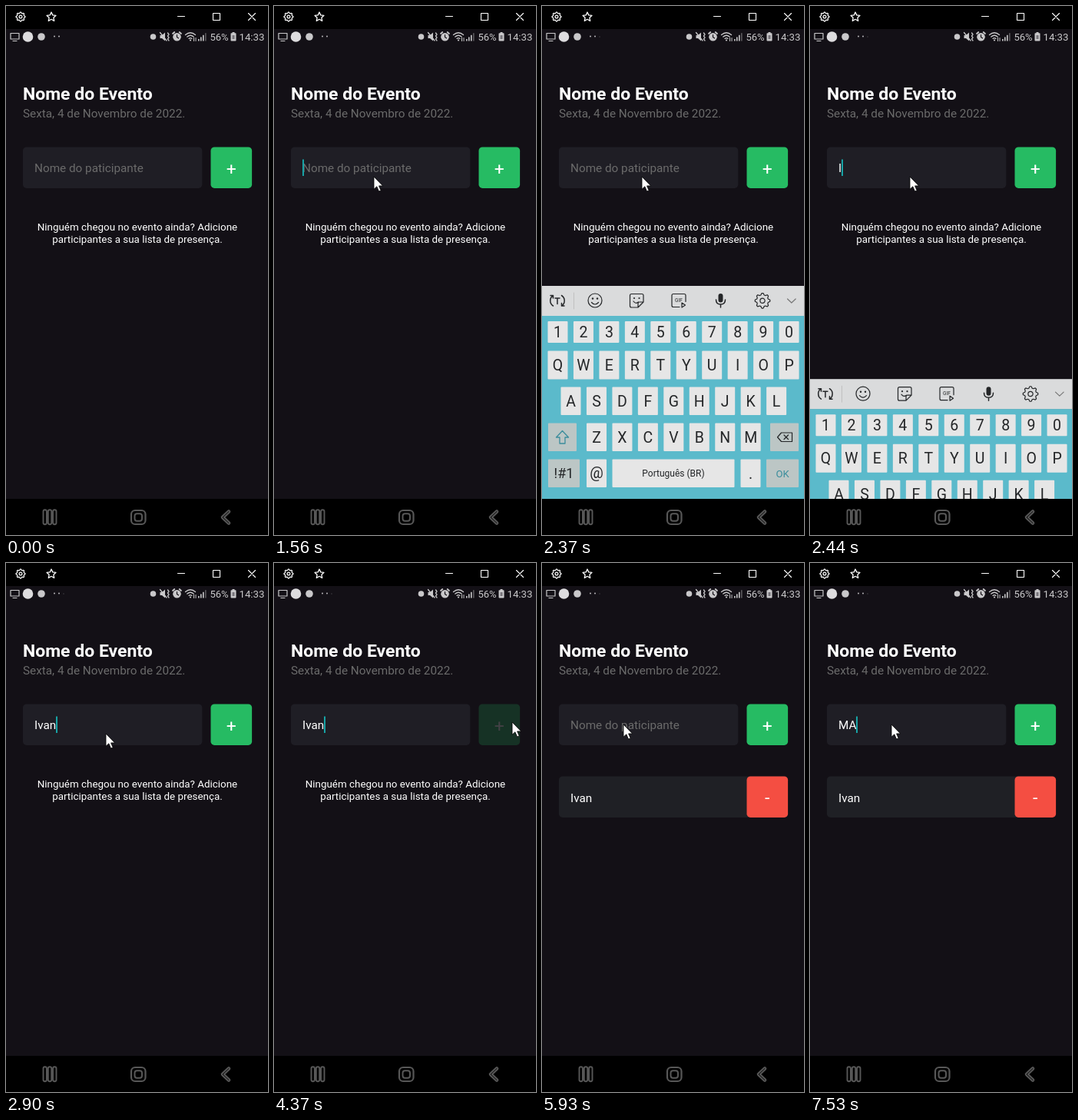
Recreate the animation shown at these times as an HTML page. Size 341 by 688 pixels, loop 7990 ms.

```html
<!DOCTYPE html>
<html lang="pt-BR">
<head>
<meta charset="utf-8">
<title>Lista de presença</title>
<style>
  html, body { margin: 0; width: 100%; height: 100%; overflow: hidden; background: #131016; }
  svg { display: block; width: 100%; height: 100%; font-family: Roboto, sans-serif; }
  .line { fill: none; stroke-linecap: round; stroke-linejoin: round; }
  .mid { text-anchor: middle; }
</style>
</head>
<body>
<svg id="stage" viewBox="0 0 341 688"></svg>
<script>
const LOOP = 7990;
const KEYBOARD_H = 277;
const GUEST = 'Ivan';

// Text sizes of the phone app, scaled to the stage.
const SMALL = 13.4, BODY = 15.31, LARGE = 22.97;

const rect = (x, y, w, h, fill, r = 0) =>
  `<rect x="${x}" y="${y}" width="${w}" height="${h}" rx="${r}" fill="${fill}"/>`;
const circle = (x, y, r, fill) => `<circle cx="${x}" cy="${y}" r="${r}" fill="${fill}"/>`;
const text = (x, y, s, size, fill, attrs = '') =>
  `<text x="${x}" y="${y}" font-size="${size}" fill="${fill}" ${attrs}>${s}</text>`;
const label = (x, y, s, size, fill) => text(x, y, s, size, fill, 'class="mid"');
const line = (d, color, w = 1.2) => `<path class="line" d="${d}" stroke="${color}" stroke-width="${w}"/>`;
const ring = (x, y, r) => `M${x - r} ${y}a${r} ${r} 0 1 0 ${2 * r} 0a${r} ${r} 0 1 0 ${-2 * r} 0`;

function polar(x, y, count, radius, turn = 0) {
  const pts = Array.from({ length: count }, (_, i) => {
    const a = (i + turn) / count * Math.PI * 2 - Math.PI / 2;
    return `${(x + radius(i) * Math.cos(a)).toFixed(2)} ${(y + radius(i) * Math.sin(a)).toFixed(2)}`;
  });
  return `M${pts.join('L')}Z`;
}
const gear = (x, y, r) => polar(x, y, 32, i => i % 4 < 2 ? r : r * 0.78, -0.5) + ring(x, y, r * 0.32);

function windowBar() {
  const w = '#fff';
  return rect(0, 0, 341, 30, '#000')
    + line(gear(19, 14, 6), w, 1.2)
    + line(polar(59, 14.3, 10, i => i % 2 ? 3 : 6.3), w, 1.3)
    + line('M223.5 13.5h9M269.5 9.5h9v9h-9ZM315.5 9.5l9 9M324.5 9.5l-9 9', w, 1.1);
}

function statusBar() {
  const c = '#c9c8ca', dark = '#131016';
  const bars = [0, 1, 2, 3].map(i =>
    rect(250 + i * 3, 43 - i * 2.6, 1.6, 2.5 + i * 2.6, i < 3 ? c : '#5c5a5e')).join('');
  return line('M6 35.5h11v7.5h-11ZM9 45.5h5', c, 1.2)
    + circle(28.5, 40, 6.8, '#dddcde') + circle(46, 40, 4.8, c)
    + circle(63, 39.5, 0.9, c) + circle(69, 39.5, 0.9, c)
    + `<g id="dot" opacity="0">${circle(75, 40, 0.7, '#4a484c')}</g>`
    + circle(191.5, 40, 3.8, c)
    + `<path d="M200.5 38h2.5l4-3.5v11l-4-3.5h-2.5Z" fill="${c}"/>`
    + line('M200.5 34.5l8.5 10.5M210.5 35l1.5 2-1.5 2 1.5 2-1.5 2 1.5 2', c, 1.3)
    + circle(222.5, 40.3, 5.3, c) + line('M217 36l2.3-2M228 36l-2.3-2', c, 1.8)
    + line('M222.5 37.5v3l2 1.3', dark, 1.2)
    + line('M233.5 37.5q6.5-5.5 13 0M235.8 40q4.2-3.5 8.4 0M238 42.4q2-1.6 4 0', c, 1.3)
    + circle(240, 44.5, 1.1, c) + line('M244.5 41.5v4M247 41.5v4', c, 1) + bars
    + text(265.5, 45, '56%', 13, c)
    + rect(294.5, 34, 3, 2, c) + rect(292.5, 35.3, 7, 10.2, c, 0.8) + rect(294.5, 38, 3, 5, '#77757a')
    + text(303.5, 45, '14:33', 13.2, c);
}

function navBar() {
  const c = '#575757';
  const pill = x => `M${x} 657.5a2.2 2.2 0 0 1 4.4 0v14.5a2.2 2.2 0 0 1-4.4 0Z`;
  const back = 'M290 657.5l-8 7.5 8 7.5';
  return rect(0, 641, 341, 47, '#000')
    + line([48.5, 54.8, 61.1].map(pill).join(''), c, 1.9)
    + `<rect x="163" y="656" width="18.5" height="18" rx="5" fill="none" stroke="${c}" stroke-width="2.2"/>`
    + `<rect x="167.5" y="660.2" width="9.5" height="9.5" rx="3" fill="none" stroke="${c}" stroke-width="2"/>`
    + line(back, c, 4.6) + line(back, '#000', 0.9);
}

function app() {
  return text(22, 121.5, 'Nome do Evento', LARGE, '#fff', 'font-weight="700"')
    + text(22, 144.5, 'Sexta, 4 de Novembro de 2022.', BODY, '#6b6b6b')
    + rect(22, 183.4, 233.3, 53.6, '#1f1e25', 4.8)
    + text(37, 216.3, 'Nome do paticipante', BODY, '#6b6b6b', 'id="hint"')
    + text(37, 216.3, '', BODY, '#fff', 'id="typed"')
    + `<rect id="caret" y="199.5" width="2" height="21.5" fill="#17a3a5"/>`
    + `<g id="add">${rect(266.5, 183.4, 53.6, 53.6, '#26bb63', 4.8)}${label(293.3, 219.5, '+', LARGE, '#fff')}</g>`
    + `<g id="empty">${label(171, 291.8, 'Ninguém chegou no evento ainda? Adicione', SMALL, '#fff')}`
    + label(171, 307.5, 'participantes a sua lista de presença.', SMALL, '#fff') + '</g>'
    + `<g id="list">${rect(22, 277.4, 298, 53.6, '#1f2025', 4.8)}${text(37, 310.5, GUEST, BODY, '#fff')}`
    + rect(266.5, 277.4, 53.6, 53.6, '#f44e42', 4.8) + label(293.3, 312.5, '-', LARGE, '#fff') + '</g>';
}

function keyboard() {
  const ink = '#242628', light = '#e6e6e6', grey = '#bcc6c5', teal = '#3b8d9c';
  const row = (chars, x0, y, h, base) => [...chars].map((ch, i) => {
    const x = x0 + i * 33.45;
    return rect(x, y, 26, h, light, 1) + label(x + 13, base, ch, 19.5, ink);
  }).join('');
  const tools = line('M14.5 390a8 8 0 0 1 0-13.5M14.5 376.5h-3.5M14.5 376.5v3.5'
      + 'M25.5 376.5a8 8 0 0 1 0 13.5M25.5 390h3.5M25.5 390v-3.5M17 380h6M20 380v7.5', ink, 1.5)
    + line('M41.5 373v21', '#c0c0c0', 1)
    + line(ring(69, 383, 9) + 'M64.5 385.5q4.5 5 9 0', ink) + circle(66, 380.5, 1.2, ink) + circle(72, 380.5, 1.2, ink)
    + line('M116.5 374.5h13.5q2 0 2 2v8.5l-7 7h-8.5q-2 0-2-2v-13.5q0-2 2-2ZM132 385h-5q-2 0-2 2v5M119 384q3 4 6.5 1', ink)
    + circle(120, 380, 1.1, ink) + circle(126.5, 380, 1.1, ink)
    + line('M179 391.5h-8q-2 0-2-2v-13q0-2 2-2h14q2 0 2 2v8M182 386l4.5 3-4.5 3Z', ink)
    + label(178, 385, 'GIF', 6.5, ink)
    + rect(229.5, 374, 6, 11.5, ink, 3) + line('M226.5 382q0 6 6 6t6-6M232.5 388v4', ink, 1.5)
    + line(gear(287, 383.3, 9.8), ink) + line('M319.5 381l5.3 5 5.3-5', '#777', 1.2);
  return rect(0, 364, 341, 39.5, '#dadbdc') + rect(0, 403, 341, 239, '#5bbacb') + tools
    + row('1234567890', 7.5, 410, 28, 431)
    + row('QWERTYUIOP', 7.5, 448.5, 37, 474)
    + row('ASDFGHJKL', 24.5, 495.5, 36.5, 521)
    + row('ZXCVBNM', 58, 542.5, 36.5, 567.5)
    + rect(8, 542.5, 37, 36.5, grey, 1) + line('M26.5 552.5l8 8.5h-4.5v8h-7v-8h-4.5Z', teal, 1.3)
    + rect(297, 542.5, 37, 36.5, grey, 1)
    + line('M311.5 555h14v11.5h-14l-5-5.75ZM315 558l5.5 5.5M320.5 558l-5.5 5.5', ink, 1.2)
    + rect(8, 589.5, 41, 36.5, grey, 1) + label(28.5, 614, '!#1', 18, ink)
    + row('@', 58, 589.5, 36.5, 613.5)
    + rect(91.5, 589.5, 159, 36.5, light, 1) + label(171, 612, 'Português (BR)', 12, ink)
    + row('.', 258.5, 589.5, 36.5, 615)
    + rect(292, 589.5, 42, 36.5, grey, 1) + label(313, 612.5, 'OK', 13, teal);
}

const $ = id => document.getElementById(id);
$('stage').innerHTML = '<clipPath id="screen"><rect width="341" height="641"/></clipPath>'
  + rect(0, 0, 341, 688, '#131016') + windowBar() + statusBar() + app()
  + `<g clip-path="url(#screen)"><g id="keys">${keyboard()}</g></g>` + navBar()
  + '<path id="mouse" d="M0 0V16.3L3.8 12.8L6.5 19L9.2 17.9L6.6 11.9H11.6Z" fill="#fff" stroke="#000" stroke-width=".8"/>';

function hops(t, a, b, n) {
  if (t < a) return 0;
  return Math.min(n, Math.floor((t - a) / (b - a) * (n - 1) + 1e-6) + 1) / n;
}
const easeOut = p => 1 - (1 - p) ** 2;
const within = (t, a, b) => t >= a && t < b;

// from, to, hops, x, y
const moves = [
  [330, 470, 3, 164, 142], [730, 1010, 5, 130, 222], [3430, 3700, 5, 310, 219],
  [3900, 3970, 2, 326, 175], [4100, 4170, 2, 310, 207], [4640, 4910, 5, 134, 217],
  [5240, 5510, 4, 114, 182], [5710, 5930, 3, 106, 210]
];
const typing = [
  [0, ''], [2440, GUEST.slice(0, 1)], [2570, GUEST.slice(0, 2)], [2700, GUEST.slice(0, 3)], [2900, GUEST],
  [4570, ''], [6060, 'M'], [6260, 'MA'], [6530, 'MAr'], [6730, 'MArc'], [6930, 'MArce'],
  [7130, 'MArc'], [7330, 'MAr'], [7530, 'MA']
];
const caretOn = [[1430, 2100], [2440, 3430], [3930, 4840], [5310, 5780], [6060, LOOP]];

function mouseAt(t) {
  let x = 278, y = 637;
  for (const [a, b, n, tx, ty] of moves) {
    const p = hops(t, a, b, n);
    x += (tx - x) * p;
    y += (ty - y) * p;
  }
  return [x, y];
}

const show = (id, on) => $(id).setAttribute('visibility', on ? 'visible' : 'hidden');

function draw(t) {
  const value = typing.filter(([at]) => at <= t).pop()[1];
  const typed = $('typed');
  typed.textContent = value;
  show('hint', !value);
  show('caret', caretOn.some(([a, b]) => within(t, a, b)));
  $('caret').setAttribute('x', 37 + (value ? Math.floor(typed.getComputedTextLength()) : 0));

  show('list', t >= 4570);
  show('empty', t < 4570);
  $('add').setAttribute('opacity', t < 4370 ? 1 : 0.2 + 0.8 * hops(t, 4500, 4710, 4));
  $('dot').setAttribute('opacity', t < 1890 ? 0 : 1);

  const up = easeOut(hops(t, 1890, 2100, 4)) - easeOut(hops(t, 2440, 2640, 4));
  show('keys', up > 0);
  $('keys').setAttribute('transform', `translate(0 ${KEYBOARD_H * (1 - up)})`);

  show('mouse', t >= 330);
  $('mouse').setAttribute('transform', `translate(${mouseAt(t)})`);
}

const start = performance.now();
function tick() {
  draw((performance.now() - start) % LOOP);
  requestAnimationFrame(tick);
}
tick();
</script>
</body>
</html>
```
